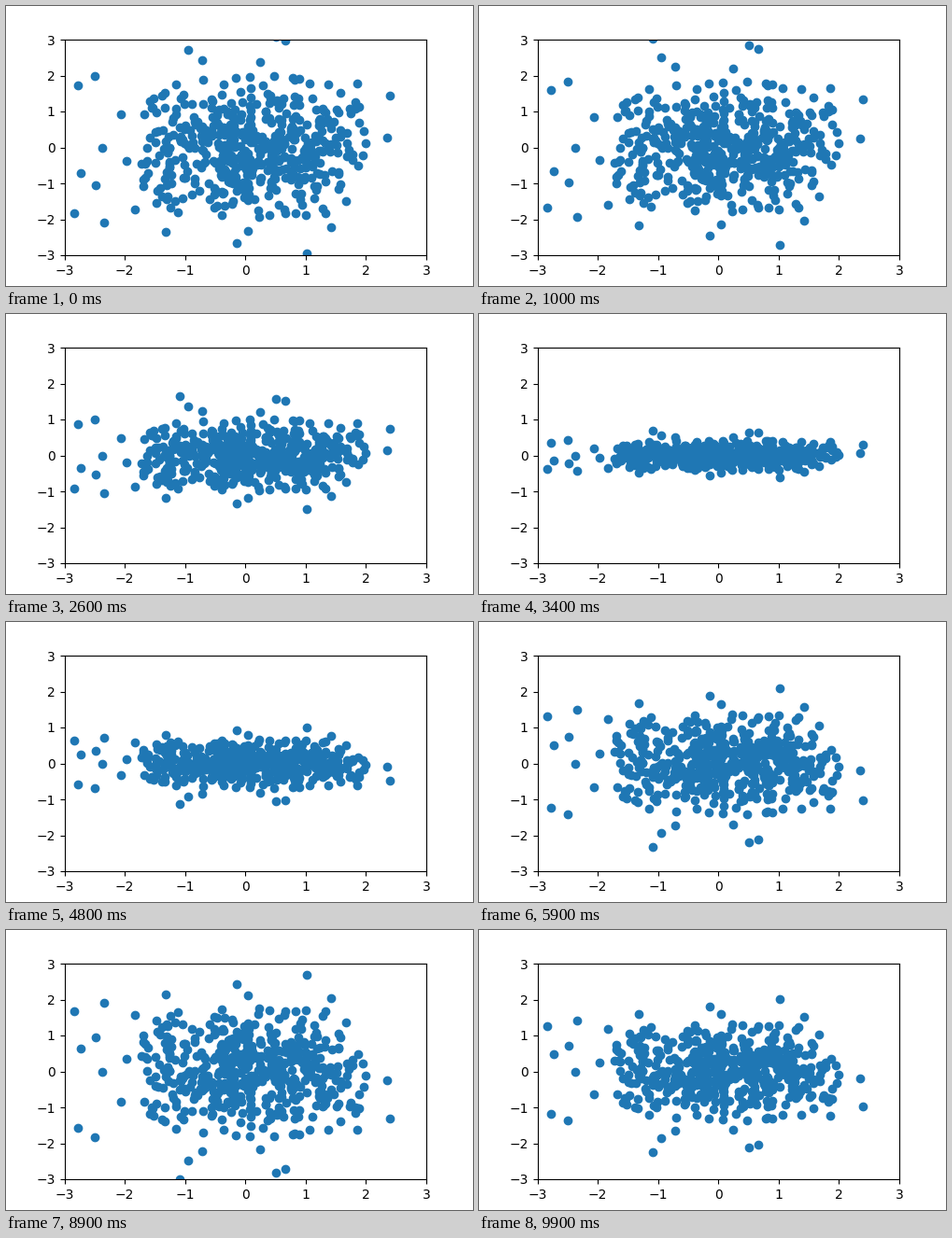
A matplotlib script that plays this animation: 500x300 px, repeating every 10 s.

```python
import numpy as np
import matplotlib.pyplot as plt
from matplotlib.animation import FuncAnimation

FRAMES = 100
INTERVAL = 100
STEP = 0.04  # phase advance per frame, radians
CORE = 480

# Outliers that stand apart from the cloud
OUTLIERS = np.array([
    (-2.84, -1.83), (-2.78, 1.73), (-2.73, -0.71), (-2.50, 1.99),
    (-2.48, -1.05), (-2.37, 0.0), (-2.34, -2.09), (-2.07, 0.93),
    (-1.97, -0.37), (-1.83, -1.73), (-1.32, -2.35), (-1.09, 3.28),
    (-0.95, 2.71), (-0.72, 2.43), (-0.14, -2.66), (0.04, -2.32),
    (0.24, 2.38), (0.51, 3.09), (0.66, 2.98), (1.02, -2.95),
    (1.42, -2.22), (1.86, 1.79), (2.40, 1.44), (2.35, 0.28),
])


def cloud(count, center, half, spread):
    """Normal points kept inside a rounded box."""
    rng = np.random.default_rng(19)
    pts = rng.normal(center, spread, (count * 4, 2))
    inside = (((pts - center) / half) ** 4).sum(axis=1) < 1
    return pts[inside][:count]


core = cloud(CORE, center=(0.13, 0), half=(1.87, 2.0), spread=(1.15, 1.0))
x, y = np.vstack([OUTLIERS, core]).T

fig, ax = plt.subplots(figsize=(5, 3), dpi=100)
dots = ax.scatter(x, y)
ax.set(xlim=(-3, 3), ylim=(-3, 3),
       xticks=range(-3, 4), yticks=range(-3, 4))


def update(i):
    dots.set_offsets(np.column_stack([x, y * np.cos(STEP * i)]))
    return dots,


anim = FuncAnimation(fig, update, frames=FRAMES, interval=INTERVAL,
                     repeat=True, repeat_delay=0)
plt.show()
```
